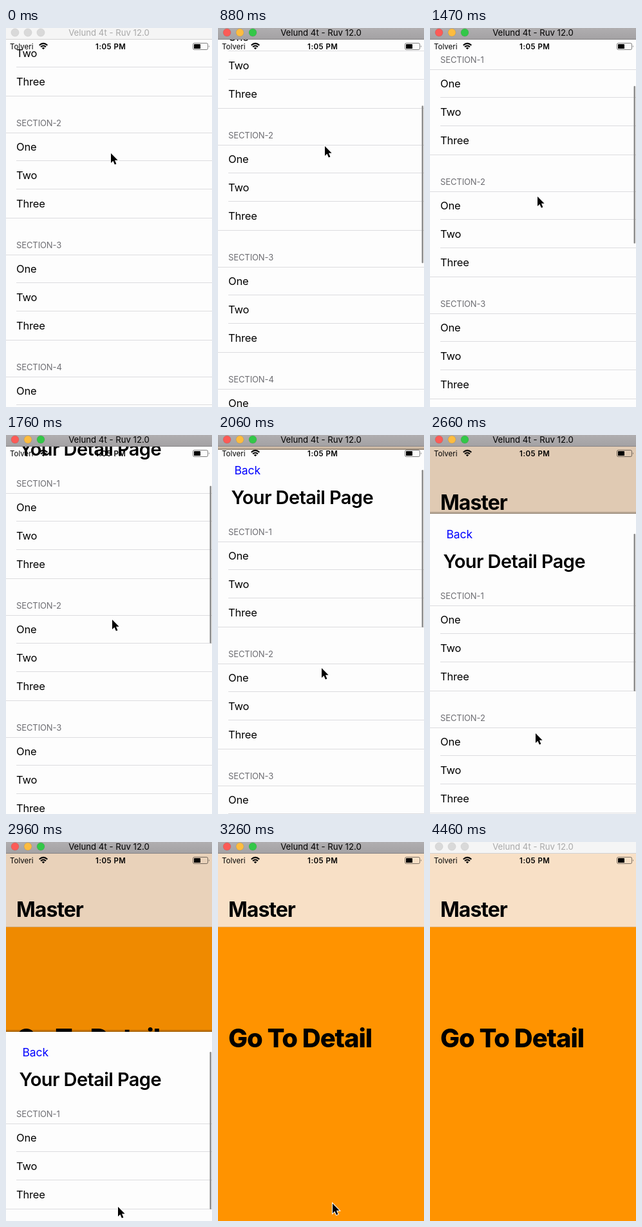
Animation, 320 px wide and 587 px high, one loop 4560 ms. Source, as an HTML page:

```html
<!DOCTYPE html>
<html lang="en">
<head>
<meta charset="utf-8">
<title>Pull to dismiss</title>
<style>
  html, body { margin: 0; width: 100%; height: 100%; overflow: hidden; background: #fff; }
  svg { display: block; width: 320px; height: 587px; font-family: Inter, Roboto, sans-serif; }
  .row { font-size: 16.5px; letter-spacing: -.2px; }
  .head { font-size: 13px; letter-spacing: -.1px; fill: #6d6d72; }
  .rule { fill: #dcdcdf; }
  .back { font-size: 17.5px; letter-spacing: -.1px; fill: #00f; }
  .page { font-size: 29px; font-weight: 600; letter-spacing: -.6px; }
  .master { font-size: 32px; font-weight: 700; letter-spacing: -1px; }
  .go { font-size: 40px; font-weight: 800; letter-spacing: -1.05px; }
  .status { font-size: 11.5px; }
  .clock { font-weight: 600; letter-spacing: .45px; text-anchor: middle; }
  .bar-title { font-size: 13.2px; text-anchor: middle; }
  #active { display: none; }
</style>
</head>
<body>
<svg viewBox="0 0 320 587">
  <defs>
    <clipPath id="screen"><rect y="18" width="320" height="569"/></clipPath>
    <linearGradient id="shade" x2="0" y2="1">
      <stop offset="0" stop-opacity="0"/>
      <stop offset="1" stop-opacity=".36"/>
    </linearGradient>
    <linearGradient id="chrome" x2="0" y2="1">
      <stop offset="0" stop-color="#b0aeb0"/>
      <stop offset="1" stop-color="#a3a1a3"/>
    </linearGradient>
  </defs>

  <g clip-path="url(#screen)">
    <rect y="18" width="320" height="113" fill="#f8e0c6"/>
    <rect y="131" width="320" height="1" fill="#dfb684"/>
    <rect y="132" width="320" height="455" fill="#ff9300"/>
    <text class="master" x="16" y="115.5">Master</text>
    <text class="go" x="16" y="318">Go To Detail</text>
    <rect id="dim" y="18" width="320" height="569"/>
    <g id="sheet">
      <rect y="-4" width="320" height="4" fill="url(#shade)"/>
      <rect width="320" height="590" fill="#fdfdfd"/>
    </g>
    <g id="content">
      <text class="back" x="25.5" y="38">Back</text>
      <text class="page" x="20.5" y="84">Your Detail Page</text>
    </g>
    <rect id="thumb" x="316.5" width="2.5" height="244" rx="1.25" fill="#8c8c8c"/>
  </g>

  <g class="status">
    <text x="6" y="32.5">Tolveri</text>
    <text class="clock" x="162.7" y="32.5">1:05 PM</text>
    <g fill="none" stroke="#000" stroke-width="2">
      <path d="M51.7 26.8Q58 21 64.3 26.8M54 29.3Q58 25.6 62 29.3"/>
    </g>
    <path d="M55.7 30.9Q58 28.9 60.3 30.9L58 33.3Z"/>
    <rect x="290.5" y="23.5" width="23" height="10" rx="2" fill="none" stroke="#000" stroke-opacity=".5"/>
    <rect x="292" y="25" width="10" height="7" rx=".6"/>
    <path d="M315 26.7q1.8 1.8 0 3.6z" fill-opacity=".6"/>
  </g>

  <g id="idle">
    <rect width="320" height="18" fill="#f5f5f5"/>
    <rect y="17" width="320" height="1" fill="#d2d2d2"/>
    <g fill="#d9d9d9" stroke="#cbcbcb" stroke-width=".6" class="lights"></g>
    <text class="bar-title" x="160" y="12" fill="#a9a9a9">Velund 4t - Ruv 12.0</text>
  </g>
  <g id="active">
    <rect width="320" height="18" fill="url(#chrome)"/>
    <rect y="17" width="320" height="1" fill="#858385"/>
    <g class="lights" stroke="#000" stroke-opacity=".15" stroke-width=".6" data-colors="#fc5b57 #fdbc40 #33c748"></g>
    <text class="bar-title" x="160" y="12">Velund 4t - Ruv 12.0</text>
  </g>

  <path id="cursor" d="M0 0V15L3.4 11.8L5.9 17.5L8.4 16.4L6 10.8H10.6Z"
    stroke="#fff" stroke-width="2" paint-order="stroke"/>
</svg>
<script>
const LOOP = 4560, TOP = 18;
const $ = id => document.getElementById(id);

function add(parent, tag, attrs, text = '') {
  const el = document.createElementNS('http://www.w3.org/2000/svg', tag);
  for (const name in attrs) el.setAttribute(name, attrs[name]);
  el.textContent = text;
  parent.append(el);
}

for (const group of document.querySelectorAll('.lights')) {
  const colors = (group.dataset.colors || '').split(' ');
  for (let i = 0; i < 3; i++) {
    const light = { cx: 14 + 20 * i, cy: 7, r: 6 };
    if (colors[i]) light.fill = colors[i];
    add(group, 'circle', light);
  }
}

for (let section = 0; section < 5; section++) {
  const y = 142 + 189 * section;
  const rule = (x, ruleY) =>
    add($('content'), 'rect', { class: 'rule', x, y: ruleY, width: 320 - x, height: 1 });
  add($('content'), 'text', { class: 'head', x: 16, y: y - 10.5 }, `SECTION-${section + 1}`);
  rule(0, y);
  ['One', 'Two', 'Three'].forEach((label, i) => {
    add($('content'), 'text', { class: 'row', x: 16, y: y + 27.5 + 44 * i }, label);
    // Inner rules sit inside the row, the closing one below it.
    if (i < 2) rule(16, y + 43 + 44 * i);
  });
  rule(0, y + 132);
}

// [ms, top of the list content]
const pull = [[0, -169], [440, -169], [590, -166], [880, -150], [1470, -78], [2060, 23],
  [2660, 122], [2810, 182], [2960, 294], [3110, 455], [3260, 600]];
// [ms, x, y] of the pointer tip
const pointer = [[0, 163, 194], [150, 163, 192], [440, 165, 176], [590, 165, 175],
  [880, 166, 183], [1470, 167, 261], [2060, 161, 361], [2660, 164, 462], [2810, 168, 508],
  [2960, 174, 565], [3260, 178, 560], [3560, 178, 560], [3860, 185, 564]];

function sample(keys, t, column = 1) {
  const next = keys.findIndex(key => key[0] > t);
  if (next < 0) return keys[keys.length - 1][column];
  const a = keys[next - 1], b = keys[next];
  return a[column] + (b[column] - a[column]) * (t - a[0]) / (b[0] - a[0]);
}

const stepTime = i => 150 * i - 10 * Math.min(4, Math.floor((i + 2) / 4));

function hold(ms) {
  let i = 30;
  while (stepTime(i) > ms) i--;
  return stepTime(i);
}

const show = (id, visible) => { $(id).style.display = visible ? 'inline' : 'none'; };
const move = (id, x, y) => $(id).setAttribute('transform', `translate(${x} ${y})`);

function draw(ms) {
  const t = hold(ms);
  const pos = Math.round(sample(pull, t));
  const top = Math.max(TOP, pos);
  const focused = t >= 150 && t < 4460;

  move('sheet', 0, top);
  move('content', 0, pos);
  move('thumb', 0, top + 31 + 0.424 * (top - pos));
  $('dim').setAttribute('opacity', Math.max(0, 0.12 * (1 - (top - TOP) / 569)));
  for (const id of ['sheet', 'content']) show(id, t < 3260);
  show('thumb', t >= 590 && t < 3260);
  show('active', focused);
  show('idle', !focused);
  move('cursor', Math.round(sample(pointer, t)), Math.round(sample(pointer, t, 2)));
  show('cursor', t < 4010);
}

const start = performance.now();
function tick() {
  draw((performance.now() - start) % LOOP);
  requestAnimationFrame(tick);
}
tick();
</script>
</body>
</html>
```
